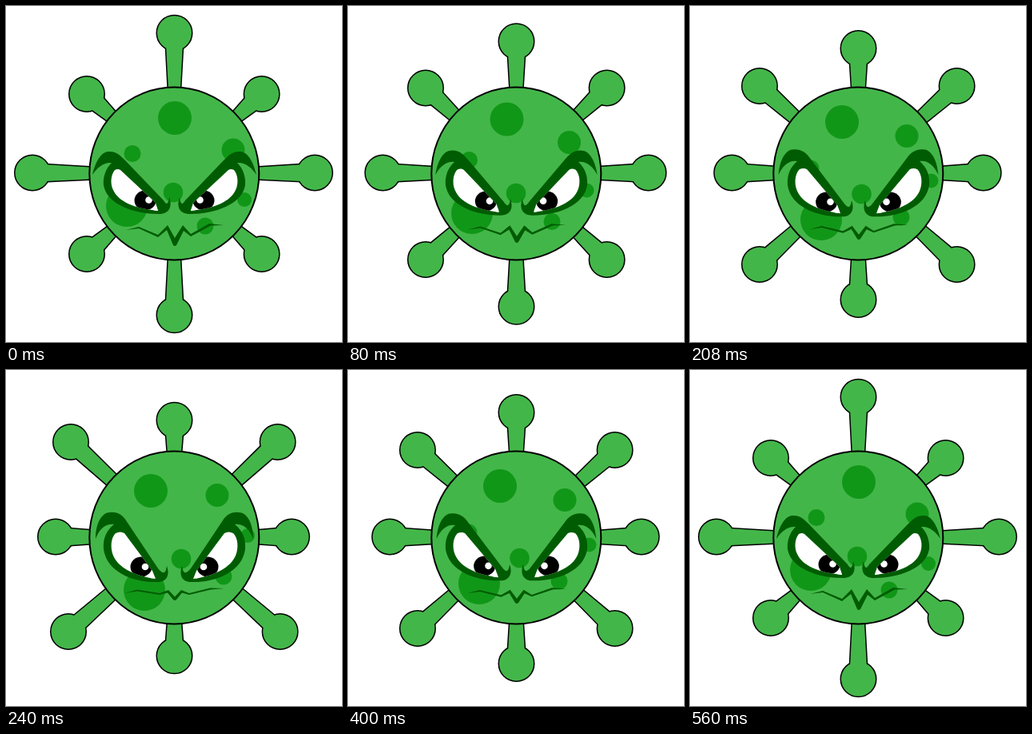
Write an HTML page with a canvas that moves like this. It is 420x420 px and loops after 640 ms.

```html
<!DOCTYPE html>
<html lang="en">
<head>
<meta charset="utf-8">
<title>Pulsing virus</title>
<style>
html, body { margin: 0; width: 100%; height: 100%; overflow: hidden; background: #fff; }
canvas { display: block; }
</style>
</head>
<body>
<canvas id="stage" width="420" height="420"></canvas>
<script>
const ctx = document.getElementById('stage').getContext('2d');
const GREEN = '#43b649', SPOT = '#119718', DARK = '#005c02';
const CX = 210.3, CY = 209.5;
const STEP = 80;
const POSES = [0, 1, 2, 3, 3, 2, 1, 0];

// Head centres per pose: [x, y] for each of the four poses
const UPPER = [[101, 110], [97, 102.5], [87, 100], [81, 90]];
const LOWER = [[101, 310], [97, 317], [87, 323], [78, 327]];
const REACH = [176.3, 165.8, 157, 147.3];

// Radius, then centre per pose
const SPOTS = [
  [21, [211, 140], [198.5, 141.5], [190, 145], [181, 151]],
  [14.5, [284, 180], [276.5, 170.5], [271, 162.5], [264, 156.5]],
  [10.5, [158, 184.5], [151.5, 192.5], [151, 203], [147, 213]],
  [12.3, [209, 233], [210, 234], [214.5, 235], [219, 236]],
  [26, [151, 250], [155, 259], [164, 267], [173, 275]],
  [10.5, [249, 275], [255, 269.5], [264, 264], [272, 258]],
  [9, [298, 242], [298.5, 230.5], [301.5, 218.5], [302, 207]]
];

// Each part of the face: wide pose and squeezed pose, same commands
const BROW = [
  'M108 211 C112 193 120 182 128 182 C138 181 144 188 149 193 L197 243 C201 250 203 247 204 239 C208 250 205 260 191 260 C160 260 126 248 122 224 C121 213 125 203 132 196 C122 195 114 202 108 211Z',
  'M112 211 C112 191 120 178 130 178 C140 177 146 182 150 188 L190 248 C198 258 200 252 201 245 C205 256 201 265 190 265 C160 266 126 253 122 224 C121 211 125 201 135 193 C124 191 116 200 112 211Z'
];
const EYE = [
  'M136 205 C131 211 130 222 134 230 C140 244 160 253 190 256 L187 246 L143 205 Q140 203 136 205Z',
  'M137 204 C131 210 130 222 134 232 C140 246 158 257 187 261 L183 251 L148 204 Q143 201 137 204Z'
];
const MOUTH = [
  'M150 280 L166 276 L190 286 L202 274 L211 290 L221 274 L231 285 L254 272 L272 274 L256 274.5 L231 288 L222 281 L213 299 Q211 301 209 299 L201 280 L190 289 L166 278Z',
  'M148 279 L164 274.5 L192 279 L203 275 L211 283.5 L219 275 L229 279 L255 272.5 L273 273 L256 274.5 L229 281 L220 278.5 L213 287 Q211 289 209 287 L202 278.5 L192 281 L164 276.5Z'
];

const mix = (a, b, k) => a + (b - a) * k;

function morph([from, to], k) {
  const ends = to.match(/[\d.]+/g);
  let i = 0;
  return new Path2D(from.replace(/[\d.]+/g, n => mix(+n, +ends[i++], k)));
}

function oval(x, y, rx, ry = rx) {
  const path = new Path2D();
  path.ellipse(x, y, rx, ry, 0, 0, Math.PI * 2);
  return path;
}

function fill(path, color) {
  ctx.fillStyle = color;
  ctx.fill(path);
}

function stem(x, y, k) {
  const len = Math.hypot(CX - x, CY - y);
  const ux = (CX - x) / len, uy = (CY - y) / len;
  const base = mix(7.5, 8.5, k);
  const path = new Path2D();
  for (const [d, w] of [[18, 10.3], [len - 106, base], [len - 95, base], [len - 95, -base], [len - 106, -base], [18, -10.3]])
    path.lineTo(x + ux * d - uy * w, y + uy * d + ux * w);
  path.closePath();
  return path;
}

function drawSpikes(pose, k) {
  const r = REACH[pose];
  const heads = [[210.5, 210 - r], [210.5, 210 + r], [209.3 - r, 208.5], [209.7 + r, 208.5]];
  for (const [x, y] of [UPPER[pose], LOWER[pose]]) heads.push([x, y], [420.6 - x, y]);
  const parts = heads.flatMap(([x, y]) => [oval(x, y, 21.5), stem(x, y, k)]);
  parts.forEach(p => ctx.stroke(p));
  parts.forEach(p => fill(p, GREEN));
}

function drawEye(k) {
  const eye = morph(EYE, k);
  fill(morph(BROW, k), DARK);
  fill(eye, '#fff');
  ctx.save();
  ctx.clip(eye);
  fill(oval(mix(174, 169, k), mix(243, 246, k), 13.5, 12.5), '#000');
  fill(oval(mix(178.5, 174, k), mix(242.5, 246, k), 4.3), '#fff');
  fill(oval(mix(187, 182, k), mix(254, 258, k), 3), '#fff');
  ctx.restore();
}

function draw(pose) {
  const k = pose / 3;
  const body = oval(CX, CY, 106, 108);
  ctx.fillStyle = '#fff';
  ctx.fillRect(0, 0, 420, 420);
  ctx.strokeStyle = '#000';
  ctx.lineWidth = 3;
  drawSpikes(pose, k);
  fill(body, GREEN);
  ctx.lineWidth = 2;
  ctx.stroke(body);
  for (const [r, ...at] of SPOTS) fill(oval(...at[pose], r), SPOT);
  drawEye(k);
  ctx.save();
  ctx.translate(421, 0);
  ctx.scale(-1, 1);
  drawEye(k);
  ctx.restore();
  fill(morph(MOUTH, k), DARK);
}

const start = performance.now();
function frame() {
  const step = Math.floor((performance.now() - start) / STEP);
  draw(POSES[step % POSES.length]);
  requestAnimationFrame(frame);
}
frame();
</script>
</body>
</html>
```
